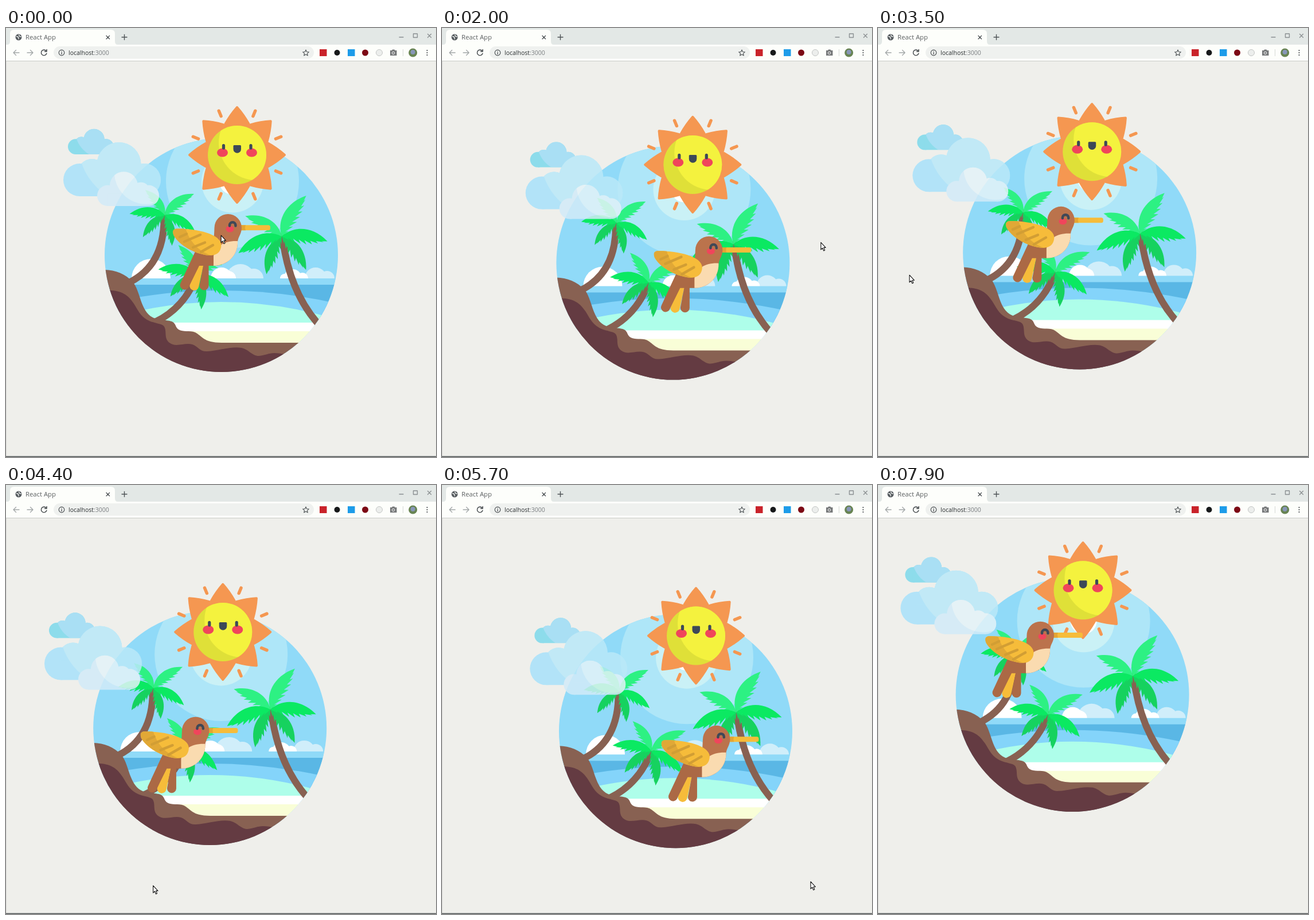
These frames come from a looping animation (750x747 px, 8000 ms). An HTML page:

```html
<!DOCTYPE html>
<html lang="en">
<head>
<meta charset="utf-8">
<title>React App</title>
<style>
html, body { margin: 0; width: 100%; height: 100%; overflow: hidden; background: #efefeb; }
svg { display: block; width: 100%; height: 100%; }
text { font-family: "Open Sans", "Noto Sans", sans-serif; }
.line { fill: none; stroke-linecap: round; stroke-linejoin: round; }
</style>
</head>
<body>
<svg viewBox="0 0 750 747">
  <defs>
    <clipPath id="disc"><circle cx="375.5" cy="395.5" r="203.5"/></clipPath>
    <clipPath id="face"><circle cx="403" cy="221" r="51"/></clipPath>
    <clipPath id="wing"><path d="M299 349.500C330 349 375 358 375.500 378C375 392 365 397 353 396C328 393 302 378 292.500 361C289.500 353 292 349.500 299 349.500Z"/></clipPath>
  </defs>

  <!-- browser frame -->
  <path fill="#e3e8e6" d="M0 0H750V29H0Z"/>
  <path fill="#fdfefb" d="M0 29H750V57H0ZM2 29Q7 29 7 23V10Q7 3 14 3H183Q190 3 190 10V23Q190 29 195 29Z"/>
  <path fill="#c9cbc8" d="M0 57H750V58H0Z"/>
  <path fill="#dcdcd9" d="M0 58H1V746H0Z"/>
  <path fill="#55595a" d="M0 745.500H750V747H0Z"/>
  <circle cx="22" cy="16" r="5.500" fill="#565b5f"/>
  <path class="line" stroke="#e8ebea" stroke-width="1.500" d="M18.500 14.500l3 1.500 .5 3M22.500 12l1 2.500 2.500 .5"/>
  <text x="34" y="20" font-size="11.300" fill="#5b5f61">React App</text>
  <rect x="83" y="32" width="454" height="21.500" rx="10.700" fill="#eff1ef"/>
  <text x="109" y="46.500" font-size="10.500" fill="#2b2f31">localhost<tspan fill="#7a7e80">:3000</tspan></text>
  <g class="line" stroke="#4e5356" stroke-width="1.400">
    <path d="M175 13.500l5.500 5.500m0-5.500l-5.500 5.500M202 16h9M206.500 11.500v9"/>
    <path stroke="#a3a7a8" d="M23 43H13m4.500-4.500L13 43l4.500 4.500M37 43h10m-4.500-4.500L47 43l-4.500 4.500"/>
    <path stroke-width="1.600" d="M70 40a4.800 4.800 0 1 0 .8 4.300M71 37.500v3.500h-3.500"/>
    <circle cx="97" cy="43" r="4.800" stroke-width="1.200"/>
    <path stroke-width="1.300" d="M97 42.500v3M97 40.400v.1"/>
    <path stroke-width="1.100" d="M523 38l1.500 3.500 3.800.3-2.900 2.500 .9 3.700-3.300-2-3.300 2 .9-3.700-2.900-2.500 3.800-.3Z"/>
    <path stroke="#8b9092" d="M686 16h7M710.500 10h7v6.500h-7ZM735.500 10.500l6 6m0-6l-6 6"/>
  </g>
  <rect x="547" y="37" width="12.500" height="12" fill="#c9232a"/>
  <circle cx="577.500" cy="43" r="5" fill="#17191a"/>
  <rect x="596" y="37" width="12.500" height="12" fill="#1d9ce9"/>
  <circle cx="626.500" cy="43" r="5.500" fill="#7c0914"/>
  <circle cx="651" cy="43" r="5.500" fill="#eceeec" stroke="#c4c6c5"/>
  <path fill="#77797a" d="M670 39h3l1-1.500h3.500l1 1.500h3v9h-11.500Z"/>
  <circle cx="675.500" cy="43.500" r="2.200" fill="#77797a" stroke="#fff"/>
  <path fill="#d5d8d6" d="M692 37h1v12h-1Z"/>
  <circle cx="709.700" cy="43" r="7.500" fill="#688453"/>
  <circle cx="709.700" cy="42" r="4" fill="#8796b8"/>
  <path class="line" stroke="#4e5356" stroke-width="2.200" d="M734.500 39v.1M734.500 43v.1M734.500 47v.1"/>

  <!-- island -->
  <g id="island"><g clip-path="url(#disc)">
    <path fill="#90daf8" d="M170 190H581V601H170Z"/>
    <circle cx="395" cy="267" r="116" fill="#aee6f8"/>
    <circle cx="395" cy="267.500" r="54" fill="#caf1f6"/>
    <circle cx="395" cy="267" r="23" fill="#fff"/>
    <g fill="#d0eefa">
      <circle cx="409" cy="436" r="25"/><circle cx="432" cy="436" r="17"/>
      <circle cx="540" cy="436" r="19"/><circle cx="560" cy="436" r="13"/>
    </g>
    <g fill="#fff">
      <circle cx="253" cy="436" r="34"/><circle cx="376" cy="436" r="19"/><circle cx="388" cy="436" r="13"/>
      <circle cx="486" cy="436" r="8"/><circle cx="500" cy="436" r="16"/><circle cx="517" cy="436" r="10"/>
    </g>
    <path fill="#90daf8" d="M170 436H581V448H170Z"/>
    <path fill="#5ab7e5" d="M170 447H581V520H170Z"/>
    <path fill="#84d4fa" d="M172 480Q375 434 579 480V520H172Z"/>
    <path fill="#aefeea" d="M172 508Q375 446 579 508V520H172Z"/>
    <path fill="#fff" d="M170 513H581V529H170Z"/>
    <path fill="#f9fed7" d="M170 528H581V550H170Z"/>
    <path class="line" stroke="#886152" stroke-width="12" d="M275.500 326Q278 413 213 444M333 430Q312 487 260 512M482 363Q494 460 547 518"/>
    <g id="palms"></g>
    <path fill="#886152" d="M170 421C190 421 208 428 221 442C235 458 234 495 258 505C270 510 285 508 291 512C297 516 295 521 301 525C309 530 320 526 330 530C342 536 344 548 376 548H560V605H170Z"/>
    <path fill="#643b42" d="M170 457C195 456 210 460 223 480C230 491 234 501 246 508C258 515 272 514 276 520C281 529 275 540 285 548C296 557 312 547 325 551C336 555 338 564 351 563C371 562 392 554 411 557C424 560 429 571 441 571C452 570 458 566 468 566Q478 566 490 569V605H170Z"/>
  </g></g>

  <!-- sun -->
  <g id="sun">
    <g id="rays" transform="translate(403 221)"></g>
    <circle cx="403" cy="221" r="51" fill="#dfe038"/>
    <circle cx="436" cy="200" r="65" fill="#f4f23e" clip-path="url(#face)"/>
    <g fill="#f0455b"><ellipse cx="377.500" cy="217" rx="9.500" ry="7.500"/><ellipse cx="428.500" cy="217" rx="9.500" ry="7.500"/></g>
    <path class="line" stroke="#3d4958" stroke-width="5.200" d="M379.500 204.500v4.500M427 204.500v4.500"/>
    <path fill="#3d4958" d="M398 204h10.500q1.500 0 1.500 1.500v5.500a6.700 6.700 0 0 1-13.500 0v-5.500q0-1.500 1.500-1.500Z"/>
  </g>

  <g id="clouds" opacity=".85"></g>

  <!-- bird -->
  <g id="bird">
    <rect x="400" y="343.300" width="61" height="9" rx="3.500" fill="#f6bc3a"/>
    <path fill="#e3a534" d="M405 343.300h13q-2 4 0 9h-13Z"/>
    <path fill="#f6bc3a" d="M337 410L320.500 447a8 8 0 0 0 15.500 4L345 410Z"/>
    <path fill="#ab6945" d="M332 385L304.500 444a8 8 0 0 0 13.500 8.500L337 414H344L337.500 448a8 8 0 0 0 16 1V414H364V380Z"/>
    <path fill="#bb734c" d="M363.500 348a23.700 24 0 0 1 47.500 0C411 359 404 364 404 374C404 396 386 414 362 414V372Q363 362 363.500 348Z"/>
    <path fill="#fadbb0" d="M404 371.500C405 396 386 414 362 414V397C366 380 380 370 404 371Z"/>
    <g clip-path="url(#wing)">
      <path fill="#f6bc3a" d="M285 340H385V405H285Z"/>
      <path fill="#e1a836" d="M285 340H311C317 370 335 390 364 398H285Z"/>
      <path class="line" stroke="#d29e34" stroke-width="4.500" d="M303 364L315 358.500M311 372L339 360M326 382L347 373.500M340 390L361 378"/>
    </g>
    <ellipse cx="390.500" cy="350" rx="7" ry="5.500" fill="#f0455b"/>
    <path class="line" stroke="#3f4857" stroke-width="4.500" d="M390 344.500v-1a5.200 5.200 0 0 1 10.400 0v1"/>
  </g>

  <path id="cursor" fill="#fff" stroke="#111" stroke-width="1.100" stroke-linejoin="round" d="M.5 .5V13L3.300 10.300 5.300 15 7.300 14.100 5.400 9.500H8.800Z"/>
</svg>
<script>
const $ = id => document.getElementById(id);

// A frond has a smooth upper edge and a saw-toothed lower one.
function frond(angle, length, color) {
  const a = angle * Math.PI / 180, dx = length * Math.cos(a), dy = length * Math.sin(a);
  const side = Math.sign(dx), teeth = 8;
  const at = (s, w) => (dx * s + dy * w * side).toFixed(1) + ' ' + (dy * s - dx * w * side).toFixed(1);
  const below = (s, w) => at(s, -w * Math.sin(Math.PI * s));
  let d = `M0 0C${at(.2, .24)} ${at(.62, .32)} ${at(1, 0)}`;
  for (let i = teeth - 1; i > 0; i--) d += `L${below(i / teeth, .03)}L${below(i / teeth + .05, .12)}`;
  return `<path fill="${color}" d="${d}Z"/>`;
}

// All palms share one crown, scaled and turned.
const dark = '#16d25f', light = '#2df183', green = '#0be962';
const crown = frond(112, 71, dark) + frond(54, 72, dark) + frond(209, 73, light) +
  frond(-59, 83, light) + frond(159, 81, green) + frond(6, 80, green);
const palm = (x, y, scale, turn) =>
  `<g transform="translate(${x} ${y}) scale(${scale}) rotate(${turn})">${crown}</g>`;
$('palms').innerHTML = palm(277, 326, .76, 23) + palm(333, 430, .84, 29) + palm(481, 363, 1, 0);

for (let a = 0; a < 360; a += 45) $('rays').innerHTML += `<g transform="rotate(${a})" stroke="#f59751">
  <path fill="#f59751" stroke-width="4" stroke-linejoin="round" d="M-20.500 -54Q-11.500 -70 0 -83Q11.500 -70 20.500 -54L0 0Z"/>
  <path class="line" stroke-width="5.500" d="M0 -73V-83" transform="rotate(22.500)"/></g>`;

// All clouds share one outline, scaled or mirrored, with a round highlight inside.
const puffs = `<circle cx="28.500" cy="-28.500" r="28.500"/><circle cx="50" cy="-40" r="25"/>
  <circle cx="97" cy="-55.500" r="38.500"/><circle cx="141.500" cy="-28.500" r="28.500"/>
  <path d="M28.500 -34H141.500V0H28.500Z"/>`;
function cloud(id, x, y, scale, shade, glow, radius, mirror) {
  const shape = mirror ? puffs.replace(/<(circle|path)/g, '$& transform="translate(170) scale(-1 1)"') : puffs;
  return `<g transform="translate(${x} ${y}) scale(${scale})">
    <clipPath id="${id}">${shape}</clipPath><g fill="${shade}">${shape}</g>
    <circle cx="135" cy="-93" r="${radius}" fill="${glow}" clip-path="url(#${id})"/></g>`;
}
$('clouds').innerHTML =
  cloud('back', 108, 220, .47, '#7cd9ec', '#9dddf6', 109) +
  cloud('middle', 100, 293, 1, '#a8e2fb', '#bae9f9', 109) +
  cloud('front', 159, 310, .635, '#d2ebf8', '#e4f3f8', 88, true);

// Key points of the sprung pointer offset that drives every layer: ms, x, y.
const path = [
  [0, 0, 0], [500, 5, 8], [900, 55, 74], [1300, 153, 185], [1800, 258, 210], [2300, 260, -25],
  [2700, 111, -226], [3200, -120, -165], [3700, -281, 40], [4400, -198, 279], [4900, 75, 322],
  [5400, 293, 334], [5700, 320, 332], [6000, 165, 326], [6300, -150, 290], [6600, -339, 118],
  [7200, -354, -220], [7900, -364, -302]];

function pull(t) {
  const last = path.length - 1;
  let i = 0;
  while (i < last - 1 && path[i + 1][0] <= t) i++;
  const a = path[i], b = path[i + 1], h = b[0] - a[0];
  const u = Math.min(1, Math.max(0, (t - a[0]) / h)), v = 1 - u;
  const slope = (j, k) => j === 0 || j === last ? 0 :
    (path[j + 1][k] - path[j - 1][k]) / (path[j + 1][0] - path[j - 1][0]);
  return [1, 2].map(k => v * v * (1 + 2 * u) * a[k] + u * u * (3 - 2 * u) * b[k] +
    h * u * v * (v * slope(i, k) - u * slope(i + 1, k)));
}

const depth = { island: 10, sun: 8, clouds: 6, bird: 3.5 };
const move = (id, x, y) => $(id).setAttribute('transform', `translate(${x.toFixed(2)} ${y.toFixed(2)})`);

function draw(now) {
  const t = Math.floor(now % 8000 / 100) * 100;
  const [x, y] = pull(t);
  for (const id in depth) move(id, x / depth[id], y / depth[id]);
  // The layers trail the pointer by a quarter second, so it runs ahead by its speed.
  const [x0, y0] = pull(t - 50), [x1, y1] = pull(t + 50);
  move('cursor', 375 + x + 2.5 * (x1 - x0), 361 + y + 2.5 * (y1 - y0));
  $('cursor').style.display = t <= 6500 ? '' : 'none';
}

let start;
function tick(now) {
  start ??= now;
  draw(now - start);
  requestAnimationFrame(tick);
}
draw(0);
requestAnimationFrame(tick);
</script>
</body>
</html>
```
